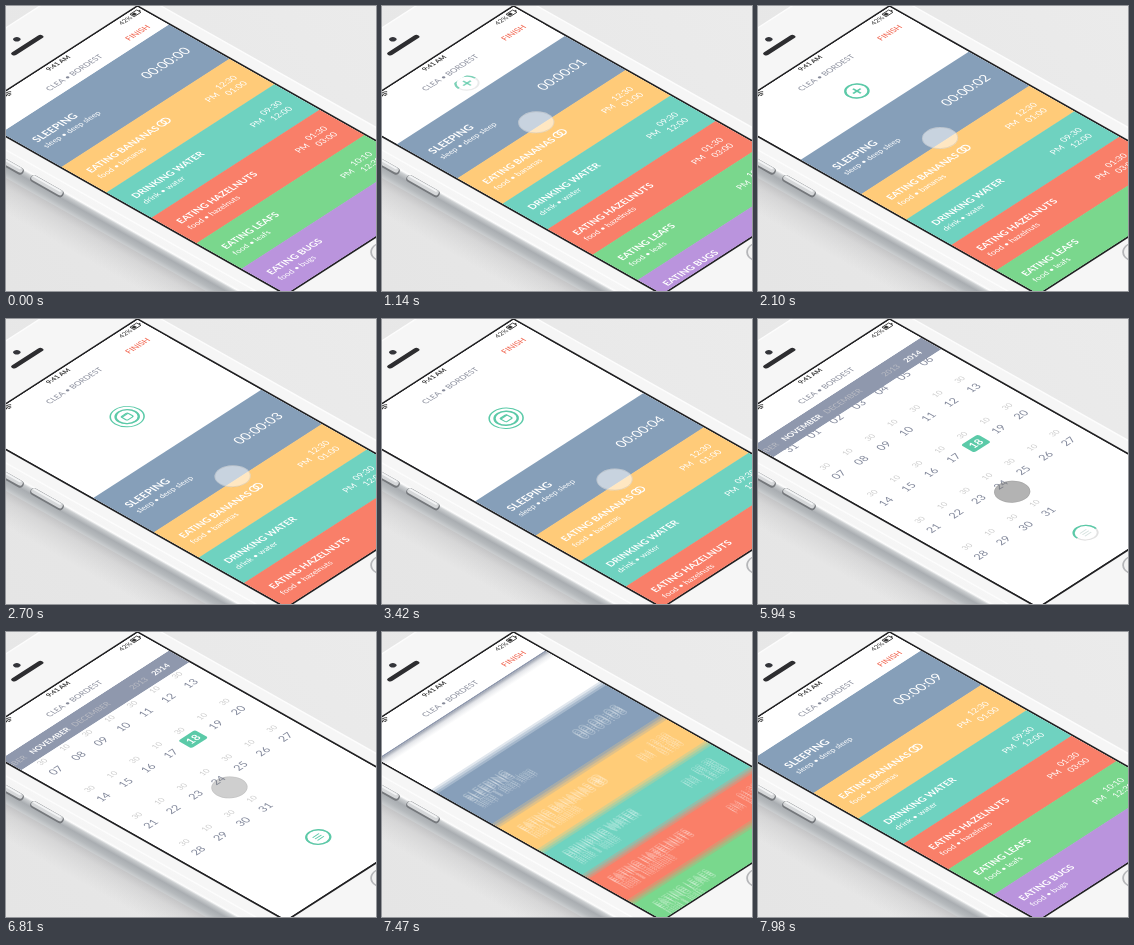
Animation of 370 by 285 pixels, one loop 8.49 s. Source, as an HTML page with a canvas:

```html
<!DOCTYPE html>
<html lang="en">
<head>
<meta charset="utf-8">
<title>Day tracker</title>
<style>
html, body { margin: 0; width: 100%; height: 100%; overflow: hidden; background: #e9e9e9; }
canvas { display: block; }
</style>
</head>
<body>
<canvas id="stage" width="370" height="285"></canvas>
<script>
const ctx = document.getElementById('stage').getContext('2d');
const LOOP = 8490;
const W = 200, TOP = -38.5, BOTTOM = 325, LIST_TOP = -2.5, BAND = 21, MARGIN = 10.5, MID = 99;
const GREEN = '#5bcaa8', SLATE = '#8f98ad';
const SLOPE = 0.565;

const ROWS = [
  ['#ffcb79', 'EATING BANANAS', 'food • bananas', '12:30', '01:00'],
  ['#6fd2c0', 'DRINKING WATER', 'drink • water', '09:30', '12:00'],
  ['#f97f69', 'EATING HAZELNUTS', 'food • hazelnuts', '01:30', '03:00'],
  ['#7ad78d', 'EATING LEAFS', 'food • leafs', '10:10', '12:30'],
  ['#ba94dd', 'EATING BUGS', 'food • bugs', '11:15', '12:45']
];
const HEAD_H = 67, ROW_H = 51.7;

const clamp = x => Math.max(0, Math.min(1, x));
const smooth = x => x * x * (3 - 2 * x);
const ramp = (t, a, b) => smooth(clamp((t - a) / (b - a)));

// Eased interpolation through [time, value] pairs.
function track(t, keys) {
  if (t <= keys[0][0]) return keys[0][1];
  for (let i = 1; i < keys.length; i++) {
    const [a, x] = keys[i - 1], [b, y] = keys[i];
    if (t < b) return x + (y - x) * ramp(t, a, b);
  }
  return keys[keys.length - 1][1];
}

const PULL_DOWN = [[750, 0], [1530, 46], [2100, 55], [2850, 112], [3450, 113], [3930, 340]];
const PULL_UP = [[5560, 0], [5940, -36.7], [6330, -70], [6840, -72], [7230, -200]];

function listOffset(t) {
  if (t < 7260) return track(t, PULL_DOWN);
  return t < 7980 ? 67 * Math.exp((7470 - t) / 130) : 0;
}

function text(str, x, y, size, color, weight = 400, align = 'left') {
  ctx.font = `${weight} ${size}px Lato, sans-serif`;
  ctx.fillStyle = color;
  ctx.textAlign = align;
  ctx.fillText(str, x, y);
}

function rect(x, y, w, h, color) {
  ctx.fillStyle = color;
  ctx.fillRect(x, y, w, h);
}

function round(x, y, w, h, r, color) {
  ctx.fillStyle = color;
  ctx.beginPath();
  ctx.roundRect(x, y, w, h, r);
  ctx.fill();
}

function ring(x, y, r, color, width, part = 1) {
  ctx.strokeStyle = color;
  ctx.lineWidth = width;
  ctx.beginPath();
  ctx.arc(x, y, r, -Math.PI, Math.PI * (2 * part - 1));
  ctx.stroke();
}

function disc(x, y, r, color) {
  ctx.fillStyle = color;
  ctx.beginPath();
  ctx.arc(x, y, r, 0, 7);
  ctx.fill();
}

function line(x1, y1, x2, y2, color, width) {
  ctx.strokeStyle = color;
  ctx.lineWidth = width;
  ctx.beginPath();
  ctx.moveTo(x1, y1);
  ctx.lineTo(x2, y2);
  ctx.stroke();
}

// Runs draw at the given opacity.
function faded(alpha, draw) {
  if (alpha <= 0) return;
  ctx.save();
  ctx.globalAlpha *= alpha;
  draw();
  ctx.restore();
}

// Strip parallel to the phone's long side, between two heights at x = 0.
function strip(c1, c2, stops) {
  const d = (c2 - c1) / (1 + SLOPE * SLOPE);
  const g = ctx.createLinearGradient(0, c1, -SLOPE * d, c1 + d);
  stops.forEach(([p, color]) => g.addColorStop(p, color));
  ctx.fillStyle = g;
  ctx.beginPath();
  ctx.moveTo(-10, c1 - 10 * SLOPE);
  ctx.lineTo(380, c1 + 380 * SLOPE);
  ctx.lineTo(380, c2 + 380 * SLOPE);
  ctx.lineTo(-10, c2 - 10 * SLOPE);
  ctx.fill();
}

function sideButton(x1, x2) {
  const y = x => 156 + SLOPE * x;
  ctx.lineCap = 'round';
  line(x1, y(x1) + 1, x2, y(x2) + 1, '#75787c', 7.5);
  line(x1, y(x1), x2, y(x2), '#d6d8da', 5.5);
  line(x1, y(x1) - 1.5, x2, y(x2) - 1.5, '#f4f5f6', 1.8);
  ctx.lineCap = 'butt';
}

function backdrop() {
  const g = ctx.createLinearGradient(0, 285, 370, 0);
  g.addColorStop(0, '#e5e5e5');
  g.addColorStop(1, '#ebebeb');
  rect(0, 0, 370, 285, g);
  strip(168, 208, [[0, 'rgba(130,130,134,.42)'], [0.35, 'rgba(150,150,153,.2)'], [1, 'rgba(170,170,170,0)']]);
  strip(143, 172, [[0, '#f6f6f6'], [0.28, '#f5f5f5'], [0.36, '#fdfdfd'], [0.44, '#cccfd1'], [0.62, '#a9adb1'], [0.82, '#b6babd'], [1, '#cccfd1']]);
  sideButton(-14, 14);
  sideButton(28, 54);
}

function body() {
  round(-14, -99, 228, 490, 30, '#f6f6f6');
  ctx.strokeStyle = '#fdfdfd';
  ctx.lineWidth = 1.5;
  ctx.stroke();
  round(83, -72, 36, 5, 2.5, '#2d2d30');
  disc(101, -81.5, 3, '#34353a');
  disc(MID, 348, 15, '#f1f1f1');
  ring(MID, 348, 15, '#b5b6b9', 1.5);
  rect(-1.8, TOP - 1.8, W + 3.6, BOTTOM - TOP + 3.6, '#202022');
}

function header(finish) {
  rect(0, TOP, W, LIST_TOP - TOP, '#fff');
  for (let r = 2; r < 7; r += 2) {
    ctx.strokeStyle = '#333';
    ctx.lineWidth = 1.1;
    ctx.beginPath();
    ctx.arc(42, -31, r, -2.35, -0.79);
    ctx.stroke();
  }
  text('9:41 AM', 100.5, -31.3, 6.7, '#333', 700, 'center');
  text('42%', 186.5, -30.5, 6.7, '#333', 400, 'right');
  ctx.strokeStyle = '#333';
  ctx.lineWidth = 0.8;
  ctx.strokeRect(188.5, -36, 8, 4.8);
  rect(189.3, -35.2, 3.4, 3.2, '#333');
  rect(197, -34.7, 1, 2.2, '#333');
  text('CLEA • BORDEST', 100, -12, 7.9, '#858998', 400, 'center');
  faded(finish, () => text('FINISH', 187.5, -11, 8, '#f1634d', 500, 'right'));
}

function list(off, seconds) {
  ctx.save();
  ctx.translate(0, off);
  rect(0, LIST_TOP, W, HEAD_H - LIST_TOP + 0.5, '#869fb9');
  text('SLEEPING', MARGIN, 29.5, 10.6, '#fff', 700);
  text('sleep • deep sleep', MARGIN, 40.5, 8, '#fff');
  text('00:00:0' + seconds, 186.5, 36.8, 13.2, '#fff', 400, 'right');
  ROWS.forEach(([color, title, sub, from, to], i) => {
    const y = HEAD_H + i * ROW_H;
    rect(0, y, W, ROW_H + 0.5, color);
    text(title, MARGIN, y + 24.2, 9.5, '#fff', 700);
    text(sub, MARGIN, y + 35.7, 8.1, '#fff');
    text(from, 186, y + 23.5, 8.7, '#fff', 400, 'right');
    text(to, 186, y + 35, 8.7, '#fff', 400, 'right');
    text('PM', 152.5, y + 29.2, 8.7, '#fff', 400, 'center');
  });
  for (const x of [98.8, 103.2]) ring(x, HEAD_H + 20, 3.7, '#fff', 1.3);
  ctx.restore();
}

// The list leaves a short trail while it snaps back quickly.
function listWithTrail(t, off, seconds) {
  const speed = t > 7260 && t < 7980 ? off * 30 / 130 : 0;
  if (speed < 1.5) return list(off, seconds);
  const n = 4;
  for (let i = 0; i < n; i++) {
    const y = off + (i / (n - 1) - 0.5) * Math.min(speed / 2, 8);
    faded(1 / (i + 1), () => {
      rect(0, LIST_TOP, W, Math.max(0, y), '#fff');
      list(y, seconds);
    });
  }
}

function addIcon(off) {
  const x = MID, y = off / 2 - 6;
  const grown = clamp((off - 58) / 48);
  const day = ramp(off, 76, 96);
  faded(clamp(off / 30), () => {
    ring(x, y, 9.6, '#e3e6e6', 1.6);
    ring(x, y, 9.6, GREEN, 1.9, clamp(off / 46));
    if (grown > 0) ring(x, y, 9.6 + 4.4 * grown, GREEN, 1.3);
    faded(1 - day, () => {
      line(x - 4.5, y, x + 4.5, y, GREEN, 1.8);
      line(x, y - 4.5, x, y + 4.5, GREEN, 1.8);
    });
    faded(day, () => {
      ctx.strokeStyle = GREEN;
      ctx.lineWidth = 1.3;
      ctx.beginPath();
      ctx.roundRect(x - 3.8, y - 3.6, 7.6, 7.2, 1.2);
      ctx.stroke();
      line(x - 3.8, y - 2.6, x + 3.8, y - 2.6, GREEN, 1.4);
    });
  });
}

function calendar(off, alpha) {
  faded(alpha, () => {
    for (let i = 0; i < 32; i++) {
      const row = Math.floor(i / 7), col = i % 7;
      const x = 19.3 + 26.75 * col, y = 59.7 + 54.4 * row + off;
      const day = i === 0 ? 31 : i;
      const today = i === 18;
      if (today) round(x - 10, y - 7.7, 20, 15.4, 2.5, GREEN);
      text(String(day).padStart(2, '0'), x, y + 3.8, 10.7, today ? '#fff' : '#82889b', today ? 700 : 400, 'center');
      text(col % 2 ? '10' : '30', x + 0.5, y - 13.5, 7.9, '#cbcbcb', 400, 'center');
    }
  });
}

function listIcon(off, alpha) {
  const x = 99.5, y = 302 + off / 2;
  const done = clamp(-off / 68);
  faded(alpha * clamp(-off / 24), () => {
    ring(x, y, 10, '#e2e2e2', 1.6);
    ring(x, y, 10, GREEN, 1.8, done);
    for (let i = -1; i < 2; i++) {
      line(x - 3.8, y + i * 2.8, x + 3.8, y + i * 2.8, done < 1 ? '#d5e2df' : GREEN, 1);
    }
  });
}

function bandShadow(y, alpha) {
  const g = ctx.createLinearGradient(0, y, 0, y + 10);
  g.addColorStop(0, 'rgba(125,133,150,.75)');
  g.addColorStop(0.4, 'rgba(150,156,170,.25)');
  g.addColorStop(1, 'rgba(170,175,185,0)');
  faded(alpha, () => rect(0, y, W, 10, g));
}

function monthBand(size) {
  if (size <= 0) return;
  const edge = LIST_TOP + (BAND - LIST_TOP) * size;
  ctx.save();
  ctx.beginPath();
  ctx.rect(0, LIST_TOP, W, edge - LIST_TOP);
  ctx.clip();
  rect(0, LIST_TOP, W, BAND - LIST_TOP, SLATE);
  const dim = 'rgba(235,228,222,.48)';
  const y = edge - 8;
  text('OCTOBER', 16, y, 8, dim, 400, 'right');
  text('NOVEMBER', 45, y, 8, '#fff', 700, 'center');
  text('DECEMBER', 94, y, 8, dim, 400, 'center');
  text('2013', 151, y, 8, dim, 400, 'center');
  text('2014', 177, y, 8, '#fff', 700, 'center');
  ctx.restore();
  bandShadow(edge, clamp(4 * (1 - size)) * clamp(12 * size));
}

function touch(y, off, alpha, color) {
  faded(alpha, () => {
    ctx.translate(0, off);
    disc(MID, y, 15, color);
    ring(MID, y, 14.6, 'rgba(130,130,130,.25)', 0.7);
  });
}

function draw(t) {
  const off = listOffset(t);
  const up = track(t, PULL_UP);
  const seconds = t < 480 ? 0 : Math.min(9, 1 + Math.floor((t - 480) / 900));
  const band = ramp(t, 3510, 3990) * (1 - ramp(t, 7200, 7530));
  const shown = ramp(t, 3690, 4380) * (1 - ramp(t, 6840, 7200));
  const drop = -26 * (1 - ramp(t, 3690, 4320));
  const finish = 1 - ramp(t, 3450, 3750) + ramp(t, 6900, 7260);

  ctx.setTransform(1, 0, 0, 1, 0, 0);
  backdrop();
  // Unit vectors of the tilted screen plane, origin under the header.
  ctx.setTransform(0.84, -0.541, 0.871, 0.492, -3, 128);
  body();

  ctx.save();
  ctx.beginPath();
  ctx.rect(0, TOP, W, BOTTOM - TOP);
  ctx.clip();
  rect(0, TOP, W, BOTTOM - TOP, '#fff');
  if (t < 4000) faded(1 - ramp(t, 3450, 3720), () => addIcon(Math.min(off, 113)));
  if (shown > 0) {
    calendar(up + drop, shown);
    listIcon(Math.max(up, -72), shown);
  }
  if (off + LIST_TOP < BOTTOM) listWithTrail(t, off, seconds);
  monthBand(band);
  header(clamp(finish));
  touch(62, Math.min(off, 113), ramp(t, 690, 810) * (1 - ramp(t, 3450, 3600)), 'rgba(255,255,255,.55)');
  touch(236.5, Math.max(up, -72), ramp(t, 5520, 5640) * (1 - ramp(t, 6750, 6900)), 'rgba(120,120,120,.56)');
  ctx.restore();
}

function tick(now) {
  draw(now % LOOP);
  requestAnimationFrame(tick);
}
draw(0);
requestAnimationFrame(tick);
</script>
</body>
</html>
```
